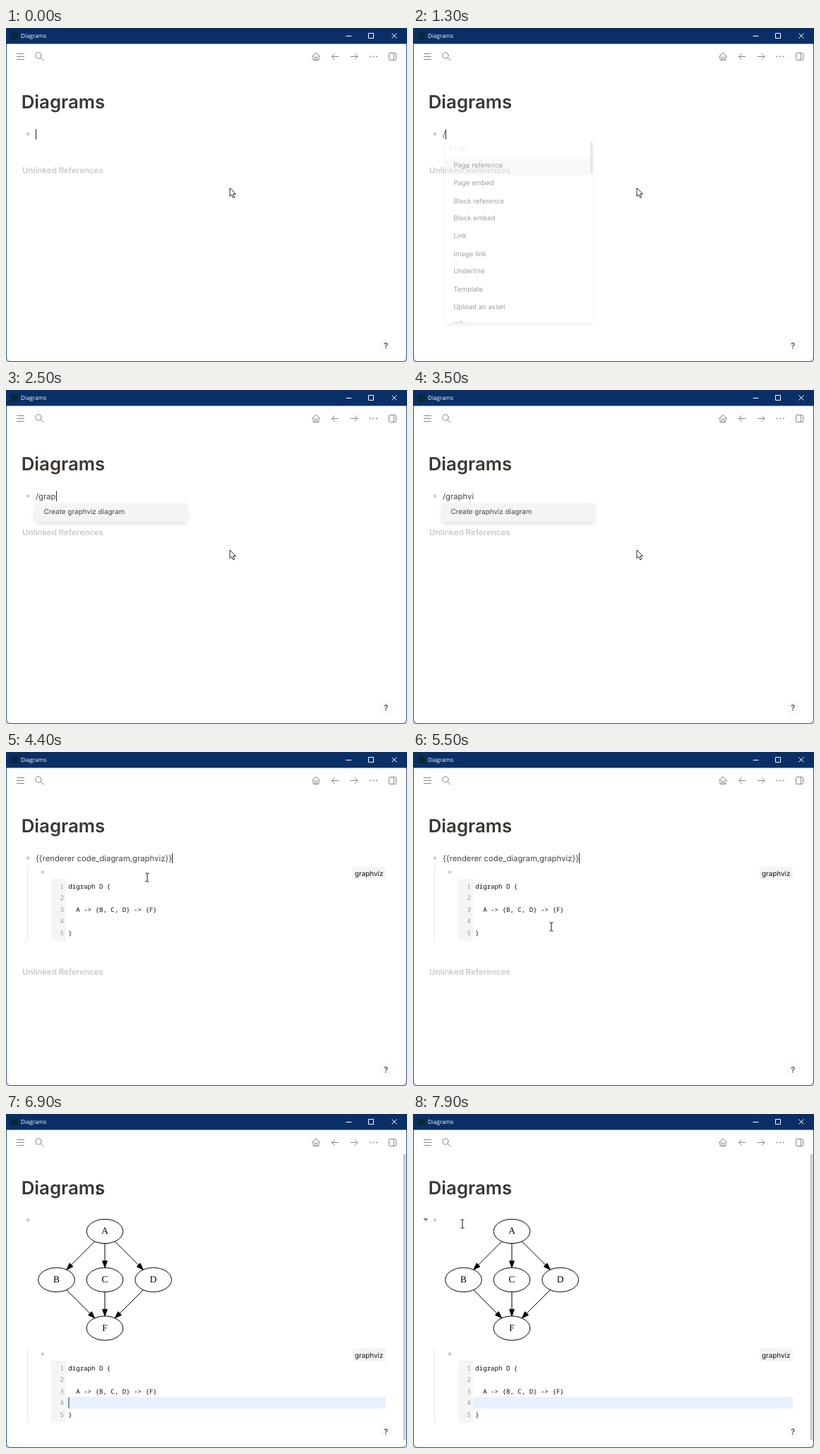
An HTML page that plays this animation: 568 px wide and 474 px high, repeating every 8 s.

```html
<!DOCTYPE html>
<html lang="en">
<head>
<meta charset="utf-8">
<title>Diagrams</title>
<style>
  html, body { margin: 0; width: 568px; height: 474px; overflow: hidden; background: #c9ced6; }
  body { text-rendering: geometricPrecision; }
  svg { position: absolute; left: 0; top: 0; }
  text { font-family: Inter, sans-serif; white-space: pre; }
  .code text { font: 9.1px "Noto Sans Mono", monospace; fill: #111; }
  .code .num { fill: #999; text-anchor: end; }
  .graph text { font: 13.4px "Liberation Serif", serif; text-anchor: middle; }
  .icons { fill: none; stroke: #858585; stroke-linecap: round; stroke-linejoin: round; }
  #menu {
    position: absolute; left: 42px; top: 161px; width: 214px; max-height: 264px; overflow: hidden;
    background: #fff; border-radius: 3px; box-shadow: 0 3px 7px rgba(0,0,0,.13);
    font: 9.9px/25.7px Inter, sans-serif; color: #454545; transform-origin: top;
  }
  #menu div { padding-left: 11.5px; white-space: nowrap; }
  #menu .head { padding-left: 5.5px; font-size: 8.5px; line-height: 23.1px; color: #d2d2d2; }
  #menu .on { background: #f4f4f4; }
  #menu i { position: absolute; right: 0; top: 0; width: 4px; background: #d2d2d2; }
</style>
</head>
<body>
<svg width="568" height="474">
  <path d="M.5 0V467Q.5 473.500 7 473.500H561Q567.500 473.500 567.500 467V0" fill="#fff" stroke="#2b4d7c"/>
  <rect width="568" height="22.500" fill="#0a2f66"/>
  <rect x="7" y="6" width="10" height="10" fill="#052a35"/>
  <text x="21" y="14" fill="#fff" style="font:8.2px 'Open Sans',sans-serif">Diagrams</text>
  <path d="M481.500 11.500h8M513.500 7.500h7v7h-7zM546.500 7.500l7 7m0-7l-7 7" fill="none" stroke="#fff"/>

  <g class="icons">
    <path d="M15.500 36.500h10m-10 4h10m-10 4h10"/>
    <circle cx="46" cy="39" r="4.200"/><path d="M49.200 42.200l4 4"/>
    <path d="M433.500 40.500l5.500-5.500 5.500 5.500m-9.500-1v6h8v-6m-5.500 6v-4h3v4"/>
    <path d="M471 40.500h-9.500m4-4l-4 4 4 4M488.500 40.500h9.500m-4-4l4 4-4 4"/>
    <path d="M515.500 40.500h.1m4.600 0h.1m4.600 0h.1" stroke-width="1.800"/>
    <rect x="542.500" y="35.500" width="10" height="10" rx="1"/><path d="M549.500 35.500v10"/>
  </g>

  <text x="21.700" y="113.500" font-size="25.800" font-weight="600" fill="#3b3733">Diagrams</text>
  <circle cx="31" cy="150.500" r="2.300" fill="#cbcbcb"/>
  <path id="arrow" d="M14.500 148h7l-3.500 4.500z" fill="#858585"/>
  <text id="line" x="42" y="154.800" font-size="11.300" fill="#444"></text>
  <rect id="caret" y="143.500" width="1" height="14.500" fill="#222"/>
  <text id="refs" x="23" font-size="11.500" font-weight="600" fill="#c9c9c9">Unlinked References</text>

  <g id="graph" class="graph" stroke-width="1"></g>
  <g id="code" class="code">
    <path d="M30.500 162v106" stroke="#e8e8e8"/>
    <circle cx="52" cy="170.500" r="2.300" fill="#cbcbcb"/>
    <rect x="491" y="163" width="47" height="18.500" rx="2" fill="#f4f4f4"/>
    <text x="494" y="176" fill="#444" style="font:9.900px Inter,sans-serif">graphviz</text>
    <rect x="64" y="180" width="21" height="88" fill="#f5f5f5"/>
    <rect id="active" x="85" y="231.500" width="453" height="16.500" fill="#e7f1fe"/>
    <rect id="codeCaret" x="88.500" y="232" width="1" height="15.500" fill="#333"/>
  </g>
  <rect id="scroll" x="562.500" y="57" width="4" height="405" fill="#cdcdcd"/>
  <circle cx="538" cy="450.500" r="10" fill="#fcfaf6"/>
  <text x="538" y="454.700" font-size="11.500" font-weight="600" fill="#555" text-anchor="middle">?</text>
</svg>

<div id="menu"></div>

<svg width="568" height="474">
  <path id="pointer" d="M0 0V12L2.800 9.400 4.900 14 6.800 13.100 4.800 8.700H8.500Z" fill="#fff" stroke="#111" stroke-width=".9"/>
  <path id="beam" d="M-2.500 -6H-.7L0 -5.300 .7 -6H2.500M0 -5.300V5.300M-2.500 6H-.7L0 5.300 .7 6H2.500" fill="none" stroke="#111"/>
</svg>

<script>
const $ = id => document.getElementById(id);
const show = (id, on) => $(id).style.display = on ? '' : 'none';
const place = (id, x, y) => $(id).setAttribute('transform', `translate(${x} ${y})`);

// Source listing
['digraph D {', '', '  A -> {B, C, D} -> {F}', '', '}'].forEach((src, i) => {
  const y = 193.5 + 16.5 * i;
  $('code').insertAdjacentHTML('beforeend',
    `<text class="num" x="82" y="${y}">${i + 1}</text><text x="88.300" y="${y}">${src}</text>`);
});

// Graph: edges run between the ellipse outlines
const RX = 25.8, RY = 17.2;
const nodes = { A: [140, 166.5], B: [71.5, 235.3], C: [140, 235.3], D: [208.7, 235.3], F: [140, 304] };
const edge = ([a, b]) => {
  const [x1, y1] = nodes[a], [x2, y2] = nodes[b];
  const len = Math.hypot(x2 - x1, y2 - y1), ux = (x2 - x1) / len, uy = (y2 - y1) / len;
  const r = 1 / Math.hypot(ux / RX, uy / RY);
  const at = (d, side = 0) => `${x1 + ux * d - uy * side} ${y1 + uy * d + ux * side}`;
  const tip = len - r, base = tip - 9.6;
  return `<path d="M${at(r)}L${at(base)}M${at(base, 3.4)}L${at(tip)}L${at(base, -3.4)}Z" stroke="#000"/>`;
};
$('graph').innerHTML = ['AB', 'AC', 'AD', 'BF', 'CF', 'DF'].map(edge).join('') +
  Object.entries(nodes).map(([name, [x, y]]) =>
    `<ellipse cx="${x}" cy="${y}" rx="${RX}" ry="${RY}" fill="none" stroke="#000"/>
     <text x="${x}" y="${y + 3.8}">${name}</text>`).join('');

// Menus: '#' marks a heading, '*' the selected row
const menus = {
  all: [47, '#BASIC', '*Page reference', 'Page embed', 'Block reference', 'Block embed', 'Link',
    'Image link', 'Underline', 'Template', 'Upload an asset', 'Info'],
  some: [170, '*DOING', 'WAITING', 'Page embed', 'Image link', '#BASIC', 'Page reference',
    'Create erd diagram', 'Create actdiag diagram', 'Create seqdiag diagram',
    'Create graphviz diagram', 'Create blockdiag diagram'],
  one: [0, '*Create graphviz diagram']
};
let shown;
function setMenu(name) {
  show('menu', name);
  if (!name || name === shown) return;
  shown = name;
  const [thumb, ...rows] = menus[name];
  const row = s => s[0] === '#' ? `<div class="head">${s.slice(1)}</div>`
    : s[0] === '*' ? `<div class="on">${s.slice(1)}</div>` : `<div>${s}</div>`;
  $('menu').innerHTML = rows.map(row).join('') + `<i style="height:${thumb}px"></i>`;
}

// [start time, value]
const typed = [[0, ''], [1300, '/'], [2100, '/g'], [2200, '/gr'], [2300, '/gra'], [2400, '/grap'],
  [2700, '/graph'], [2800, '/graphv'], [2900, '/graphvi'],
  [4400, '{{renderer code_diagram,graphviz}}'], [5800, '']];
const menuAt = [[0, ''], [1300, 'all'], [2200, 'some'], [2500, 'one'], [4200, '']];
const caretAt = [[0, 1], [200, 0], [700, 1], [1800, 0], [2100, 1], [3500, 0], [4000, 1],
  [4900, 0], [5400, 1], [5800, 0]];
const path = [[0, 317, 227], [3600, 317, 227], [4200, 200, 178], [4800, 200, 178], [5300, 196, 225],
  [5500, 196, 248], [5800, 201, 239], [6200, 201, 239], [6600, 185, 134], [6900, 130, 108],
  [7200, 87, 105], [7500, 210, 106], [7700, 140, 125], [7900, 70, 156], [8000, 70, 156]];

const pick = (steps, t) => steps.filter(s => s[0] <= t).pop()[1];
function mouse(t) {
  const i = path.findIndex(p => p[0] > t), [t0, x0, y0] = path[i - 1], [t1, x1, y1] = path[i];
  const k = (t - t0) / (t1 - t0), e = k * k * (3 - 2 * k);
  return [x0 + (x1 - x0) * e, y0 + (y1 - y0) * e];
}

function render(now) {
  const t = Math.floor(now % 8000 / 100) * 100;   // the picture changes in 100 ms steps
  const inserted = t >= 4400, drawn = t >= 5800;

  $('line').textContent = pick(typed, t);
  $('caret').setAttribute('x', 42 + Math.round($('line').getComputedTextLength()));
  show('caret', pick(caretAt, t));

  const opening = t === 1300;
  setMenu(pick(menuAt, t));
  $('menu').style.opacity = opening ? .5 : 1;
  $('menu').style.transform = opening ? 'translateX(1.5px) scale(.975)' : '';

  $('refs').setAttribute('y', inserted ? 315.5 : 205.5);
  show('refs', !drawn);
  show('code', inserted);
  place('code', 0, drawn ? 170 : 0);
  for (const id of ['graph', 'active', 'scroll']) show(id, drawn);
  show('codeCaret', drawn && (t - 5800) % 1060 < 530);

  const [x, y] = mouse(t);
  show('arrow', drawn && y > 140);
  show('pointer', t < 4200);
  show('beam', t >= 4200);
  place('pointer', x, y);
  place('beam', x, y);
}

const start = performance.now();
(function loop() {
  render(performance.now() - start);
  requestAnimationFrame(loop);
})();
</script>
</body>
</html>
```
